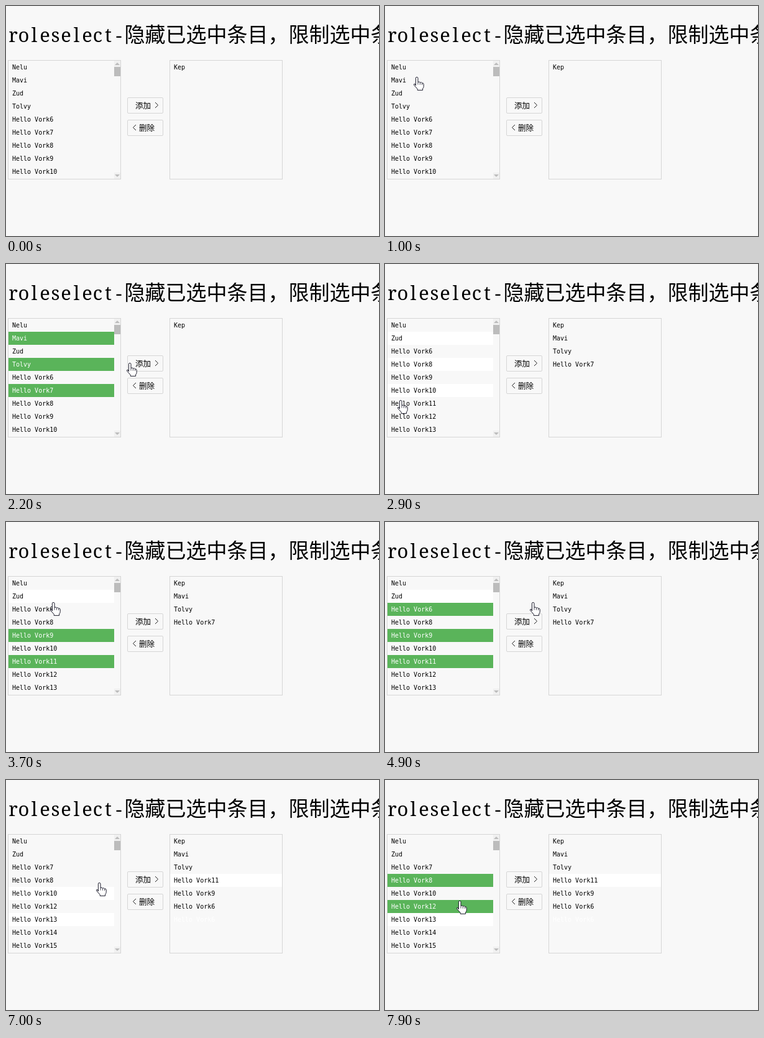
An HTML page for the animation above (8000 ms loop, 600 px wide and 370 px high).

```html
<!DOCTYPE html>
<html lang="zh-CN">
<head>
<meta charset="utf-8">
<title>roleselect</title>
<style>
  html, body { margin: 0; width: 100%; height: 100%; overflow: hidden; background: #f8f8f8; }
  svg { display: block; }
  text { white-space: pre; }
  .latin { font: 31px "Noto Serif", serif; text-anchor: middle; }
  .title { font: 500 33px "Noto Sans CJK SC", "Noto Sans CJK", sans-serif; }
  .label { font: 12.5px "Noto Sans CJK SC", "Noto Sans CJK", sans-serif; }
  .item { font: 10px "DejaVu Sans Mono", monospace; }
  .frame { fill: none; stroke: #d6d6d6; }
  .chevron { fill: none; stroke: #222; }
</style>
</head>
<body>
<svg width="600" height="370" viewBox="0 0 600 370">
  <g id="heading"></g>
  <text class="title" x="190.5" y="58">隐藏已选中条目，限制选中条目</text>

  <g id="rows"></g>

  <rect class="frame" x="3.5" y="87.5" width="181" height="191"/>
  <rect class="frame" x="263.5" y="87.5" width="181" height="191"/>

  <path d="M174 88h10v10h-10zM174 268h10v10h-10z" fill="#f0f0f0"/>
  <rect x="174" y="98" width="10" height="15" fill="#bcbcbc"/>
  <path d="M175 95l4-4 4 4zM175 271l4 4 4-4z" fill="#bcbcbc"/>

  <rect class="frame" x="195.5" y="147.5" width="57" height="25" rx="1.5"/>
  <text class="label" x="208" y="165">添加</text>
  <path class="chevron" d="M240 155l4.5 4.5-4.5 4.5"/>
  <rect class="frame" x="195.5" y="183.5" width="57" height="25" rx="1.5"/>
  <text class="label" x="214" y="201">删除</text>
  <path class="chevron" d="M209 191l-4.5 4.5 4.5 4.5"/>

  <g id="cursor" stroke="#1c1c2c" stroke-linejoin="round">
    <path fill="#fff" d="M-1.6 13V1.2a1.8 1.8 0 0 1 3.6 0V7.5q2.5-1.4 3.4.6 2.4-1 3.2.8 2.4-.6 2.6 2v3.6q0 2-1.6 3.4V20.4H1.2V18.4L-4.4 12.2q-.6-2 1.4-2z"/>
    <path fill="none" stroke-width=".8" d="M2 7.5v4M5.4 8.2v3.5M8.6 9v3"/>
  </g>
</svg>
<script>
const LOOP = 8000, STEP = 100;
const ROW = 21, TOP = 88, VISIBLE = 9;
const SPEED = 0.9, MIN_MOVE = 200;   // px per ms, ms
const COLORS = { green: '#5ab45a', white: '#fff' };
const byId = id => document.getElementById(id);

const numbered = n => 'Hello Vork' + n;
const pool = ['Nelu', 'Mavi', 'Zud', 'Tolvy',
  ...Array.from({ length: 14 }, (_, i) => numbered(i + 6))];

const rowY = row => TOP + (row + 0.6) * ROW;
const stop = (arrive, x, y, click) => ({ arrive, x, y, click });

// Where the pointer goes, when it arrives and when it clicks there.
const tour = [
  stop(400, 499, 135),
  stop(1000, 51, 115, 1200),
  stop(1400, 54, 168, 1600),
  stop(1700, 54, 210, 1900),
  stop(2200, 199, 160, 2400),
  stop(2900, 25, 220, 3100),
  stop(3300, 60, rowY(4), 3500),
  stop(3700, 76, 130, 4400),
  stop(4700, 238, 130),
  stop(5100, 231, 152, 5300),
  stop(5600, 315, 160, 5900),
  stop(6100, 220, 193, 6400),
  stop(6800, 160, 122),
  stop(7000, 150, 166, 7400),
  stop(7500, 122, 201, 7800),
  stop(7900, 120, 195),
];

function pointerAt(t) {
  const next = tour.findIndex(s => s.arrive > t);
  if (next === 0) return null;
  if (next < 0) return tour[tour.length - 1];
  const a = tour[next - 1], b = tour[next];
  const duration = Math.max(MIN_MOVE, Math.hypot(b.x - a.x, b.y - a.y) / SPEED);
  const k = Math.max(0, 1 - (b.arrive - t) / duration);
  return { x: a.x + (b.x - a.x) * k, y: a.y + (b.y - a.y) * k };
}

function hit({ x, y }) {
  const row = Math.floor((y - TOP) / ROW);
  if (x < 174) return 'left' + row;
  if (x > 264 && x < 444) return 'right' + row;
  return y < 178 ? 'add' : 'remove';
}

const available = chosen => pool.filter(name => !chosen.includes(name)).slice(0, VISIBLE);

function press(state, target) {
  const isButton = target === 'add' || target === 'remove';
  if (!isButton) {
    state.marks[target] = 'green';
    state.selected.push(target);
    return;
  }
  const side = target === 'add' ? 'left' : 'right';
  const list = side === 'left' ? available(state.chosen) : state.chosen;
  const names = state.selected.map(key => list[key.slice(side.length)]);
  if (target === 'add') {
    state.chosen = [...state.chosen, ...names];
  } else {
    // The last line leaves a faint white trace behind.
    state.trace = { row: list.length - 1, name: list[list.length - 1] };
    state.chosen = list.filter(name => !names.includes(name));
  }
  for (const key of state.selected) state.marks[key] = 'white';
  state.selected = [];
}

// Replays the tour: clicks mark rows, hovering wipes white rows.
function stateAt(t) {
  const state = { chosen: ['Kep'], marks: {}, selected: [], trace: null, pointer: null };
  for (let now = 0; now <= t; now += STEP) {
    state.pointer = pointerAt(now);
    const hovered = state.pointer && hit(state.pointer);
    if (state.marks[hovered] === 'white') delete state.marks[hovered];
    const clicked = tour.find(s => s.click === now);
    if (clicked) press(state, hit(clicked));
  }
  return state;
}

function textMarkup(side, row, name, fill) {
  const x = side === 'left' ? 10 : 270;
  return `<text class="item" x="${x}" y="${TOP + row * ROW + 14}" fill="${fill}">${name}</text>`;
}

function rowMarkup(side, row, name, mark) {
  const [x, width] = side === 'left' ? [4, 170] : [264, 180];
  const fill = COLORS[mark] || 'none';
  return `<rect x="${x}" y="${TOP + row * ROW}" width="${width}" height="${ROW}" fill="${fill}"/>` +
    textMarkup(side, row, name, mark === 'green' ? '#fff' : '#000');
}

function render(t) {
  const { chosen, marks, trace, pointer } = stateAt(t);
  const listMarkup = (side, names) =>
    names.map((name, i) => rowMarkup(side, i, name, marks[side + i])).join('');
  byId('rows').innerHTML = listMarkup('left', available(chosen)) + listMarkup('right', chosen) +
    (trace ? textMarkup('right', trace.row, trace.name, '#fff') : '');

  byId('cursor').setAttribute('visibility', pointer ? 'visible' : 'hidden');
  if (pointer) {
    byId('cursor').setAttribute('transform',
      `translate(${Math.round(pointer.x)} ${Math.round(pointer.y)})`);
  }
}

// Even cells for the Latin part of the heading.
const heading = 'roleselect-';
const cells = [...heading].map((_, i) => 11.5 + i * 17).join(' ');
byId('heading').innerHTML = `<text class="latin" x="${cells}" y="58">${heading}</text>`;

let shown = -1;
const start = performance.now();
function tick() {
  const t = Math.floor((performance.now() - start) % LOOP / STEP) * STEP;
  if (t !== shown) render(shown = t);
  requestAnimationFrame(tick);
}
tick();
</script>
</body>
</html>
```
